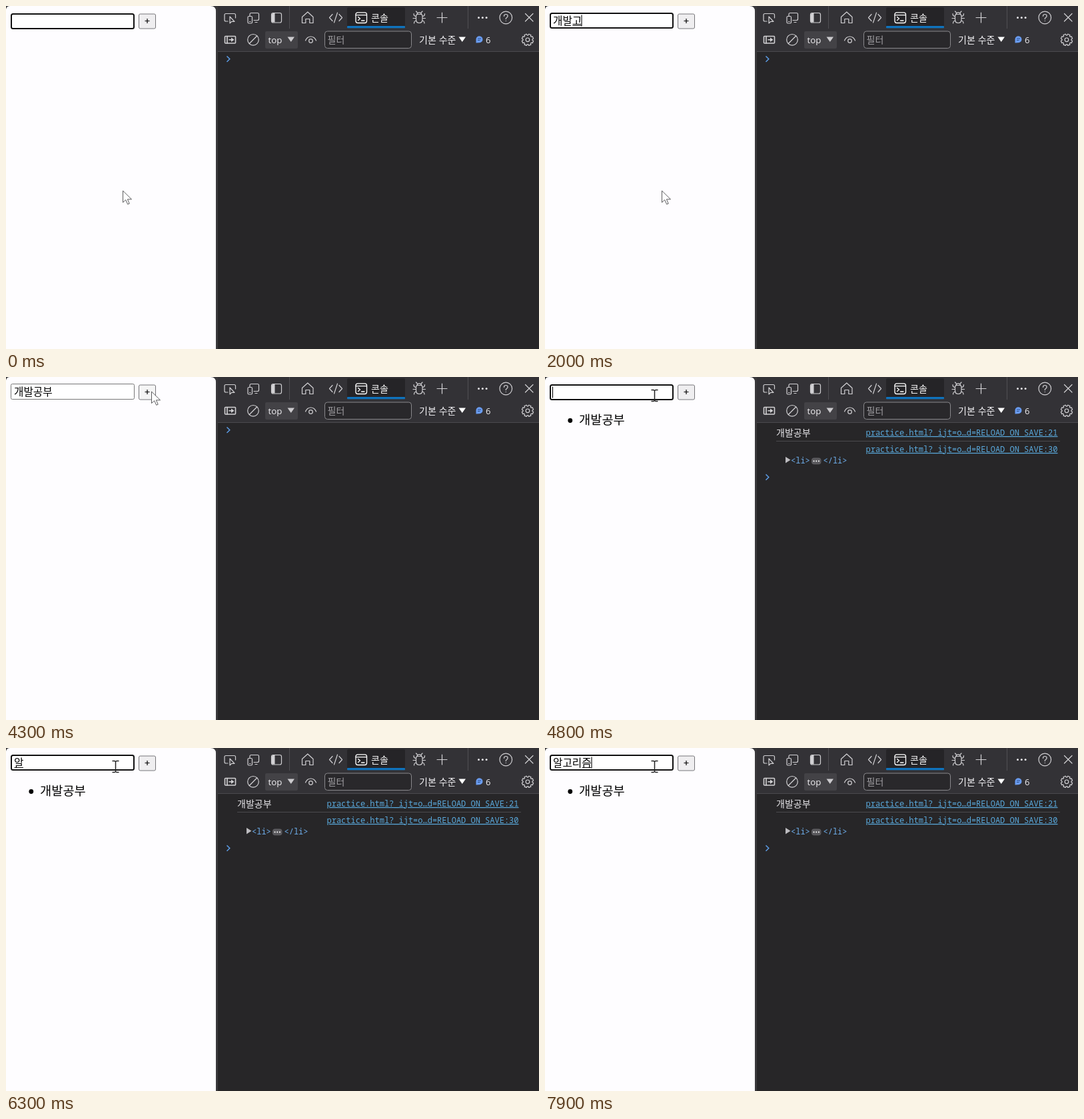
An HTML page that plays this animation: 800x516 px, repeating every 8000 ms.

```html
<!DOCTYPE html>
<html lang="ko">
<head>
<meta charset="utf-8">
<title>할 일 입력과 콘솔</title>
<style>
  html, body { margin: 0; width: 100%; height: 100%; overflow: hidden; background: #39383b; }
  svg { display: block; width: 800px; height: 516px; }
  text { font-family: "Open Sans", "Noto Sans CJK KR", "Noto Sans CJK", sans-serif; font-size: 14px; white-space: pre; }
  .ko { font-family: "Noto Sans CJK KR", "Noto Sans CJK", sans-serif; }
  .mono { font-family: "Noto Sans Mono", "Liberation Mono", monospace; font-size: 12px; fill: #5aa9dc; }
  .link { text-decoration: underline; text-underline-offset: 1px; }
  .icons { fill: none; stroke: #d2d1d4; stroke-width: 1.2; stroke-linecap: round; stroke-linejoin: round; }
  .solid { fill: #d2d1d4; stroke: none; }
</style>
</head>
<body>
<svg viewBox="0 0 800 516" xmlns="http://www.w3.org/2000/svg">
  <!-- developer tools -->
  <rect width="800" height="516" fill="#39383b"/>
  <rect x="318" width="482" height="69" fill="#333236"/>
  <rect x="318" y="69" width="482" height="447" fill="#272628"/>
  <path d="M318 68.5H800" stroke="#4b4a4e"/>
  <path d="M425.5 0V34M693.5 0V34" stroke="#504f53"/>
  <rect x="512" y="2" width="87" height="31" rx="2" fill="#252427"/>
  <rect x="512" y="30" width="87" height="3.3" rx="1" fill="#0f73bd"/>
  <rect x="389" y="38" width="49" height="26" rx="2" fill="#434246"/>
  <rect x="478.5" y="38" width="130" height="25.5" rx="4" fill="#29282b" stroke="#89888c"/>

  <g class="icons">
    <path d="M333 23H330Q328 23 328 21V13.500Q328 11.500 330 11.500H342.500Q344.500 11.500 344.500 13.500V18"/>
    <path d="M336 16V26L338.700 23.300H343Z"/>
    <path d="M366 15V12.500Q366 10.500 368 10.500H377.500Q379.500 10.500 379.500 12.500V19.500Q379.500 21.500 377.500 21.500H372M374 24.500H377"/>
    <rect x="363" y="15.500" width="6.500" height="10.500" rx="1.500"/>
    <path d="M365.500 23.500H367"/>
    <rect x="398.500" y="10.500" width="15" height="14.500" rx="2.500"/>
    <path class="solid" d="M399 12.500Q399 11 401 11H403.500V24.500H401Q399 24.500 399 23Z"/>
    <path d="M444.500 16.500L452.800 9L461 16.500V25.500H455.800V19.500H449.800V25.500H444.500Z"/>
    <path d="M490 12.500L485.500 17.500L490 22.500M500 12.500L504.500 17.500L500 22.500M497.500 10L492.500 25"/>
    <g stroke="#fff" stroke-width="1.300">
      <rect x="525" y="9.800" width="16.500" height="15.700" rx="3"/>
      <path d="M525 13.700H541.500M528.500 16.500L531.500 19L528.500 21.500M533.500 22H538"/>
    </g>
    <path d="M615.500 15Q615.500 12.500 618 12.500H622.500Q625 12.500 625 15V20.500Q625 25.500 620.250 25.500T615.500 20.500ZM617 12.500Q617 9.800 620.250 9.800T623.500 12.500M617 9.500L615.500 8M623.500 9.500L625 8M615.500 15.500Q612 15.500 612 11.500M625 15.500Q628.500 15.500 628.500 11.500M615.500 18.500H611M625 18.500H629.500M616 22Q612.500 22.500 612.500 26M624.500 22Q628 22.500 628 26"/>
    <path d="M647 17.500H662M654.500 10V25"/>
    <path d="M779.500 11.500L791 23M791 11.500L779.500 23"/>
    <circle cx="750.300" cy="17.500" r="9.300"/>
    <path d="M747.500 15.300Q747.500 12.500 750.300 12.500T753.100 15Q753.100 16.500 751.500 17.500T750.300 19.700M750.300 22.300V22.400"/>
    <g stroke-width="1.600">
      <rect x="328.500" y="45.500" width="16" height="10.500" rx="1"/>
      <path d="M332 45.500V56M335 50.800H340"/>
      <path class="solid" d="M338 47.500L342.500 50.800L338 54Z"/>
    </g>
    <circle cx="371" cy="50.800" r="8.300"/>
    <path d="M365.300 56.500L376.700 45"/>
    <path d="M449.500 52Q452 46 457.500 46T465.500 52"/>
    <circle cx="457.500" cy="52.500" r="2.800"/>
    <circle cx="783" cy="50.800" r="2.800"/>
    <path id="gear"/>
  </g>
  <g fill="#e4e3e6">
    <circle cx="709.500" cy="17.500" r="1.500"/><circle cx="715.300" cy="17.500" r="1.500"/><circle cx="721.100" cy="17.500" r="1.500"/>
    <path d="M422.500 46.500H433L427.750 54Z" fill="#cbcacd"/>
    <path d="M679.500 46.500H690L684.750 54Z" fill="#fff"/>
  </g>
  <path d="M705.500 55.500V50A5 5 0 1 1 710.500 55.300Z" fill="#6a9cf0"/>
  <path d="M708 49H713M708 51.500H711.500" stroke="#2c4f8a"/>
  <g fill="#f2f1f4">
    <text class="ko" x="548" y="22.500" fill="#fff" font-weight="500">콘솔</text>
    <text x="393.500" y="56" style="font-size:13.300px">top</text>
    <text class="ko" x="482.500" y="56" fill="#a09fa3">필터</text>
    <text class="ko" x="620" y="56">기본 수준</text>
    <text x="720" y="56" style="font-size:13px">6</text>
  </g>

  <g id="log">
    <text class="ko" x="347" y="89" fill="#e6e5e8">개발공부</text>
    <text class="mono link" x="481.500" y="88">practice.html?_ijt=o…d=RELOAD_ON_SAVE:21</text>
    <path d="M347 96.500H773" stroke="#4b4a4e"/>
    <text class="mono link" x="481.500" y="113">practice.html?_ijt=o…d=RELOAD_ON_SAVE:30</text>
    <path d="M361 120L368.500 124.700L361 129.500Z" fill="#bdbcc0"/>
    <text class="mono" x="369" y="130" style="fill:#6fb0ee">&lt;li&gt;</text>
    <rect x="400" y="121.500" width="14.500" height="10" rx="4" fill="#5a595d"/>
    <path d="M403.500 126.500h.1m3.600 0h.1m3.600 0h.1" stroke="#fff" stroke-width="2" stroke-linecap="round"/>
    <text class="mono" x="417.500" y="130" style="fill:#6fb0ee">&lt;/li&gt;</text>
  </g>
  <path id="prompt" d="M331.500 75.500L335.800 79.700L331.500 84" fill="none" stroke="#5c9ce6" stroke-width="1.500"/>

  <!-- web page -->
  <path d="M0 516V5Q1 0 6 0H307Q315 0 315 8V516Z" fill="#fefdff"/>
  <rect id="field" fill="#fff"/>
  <text id="typed" class="ko" x="12" y="27.500" style="font-size:15.700px"></text>
  <path id="underline" stroke="#111"/>
  <path id="caret" stroke="#000" stroke-width="1.100"/>
  <rect id="button" x="199.500" y="12" width="25" height="22" rx="2" stroke="#77767a"/>
  <path d="M208.500 22.500H215.500M212 19V26" stroke="#000" stroke-width="1.200"/>
  <g id="item">
    <circle cx="37.800" cy="65.500" r="3.400"/>
    <text class="ko" x="51" y="71.300" style="font-size:18.700px">개발공부</text>
  </g>
  <path id="arrow" d="M0 0V17.500L4.200 13.700L7.200 20.300L9.700 19.200L6.900 12.800H13Z" fill="#fff" stroke="#4a4a4c" stroke-width=".9" stroke-linejoin="round"/>
  <path id="beam" d="M-5 -8.500H-1.500L0 -7.500L1.500 -8.500H5M0 -7.500V7.500M-5 8.500H-1.500L0 7.500L1.500 8.500H5" fill="none" stroke="#222" stroke-width="1.500"/>
</svg>
<script>
const LOOP = 8000, TICK = 100, BLINK = 500, ADVANCE = 15.7 * 0.92;
const PRESS = 4200, RELEASE = 4500, REFOCUS = 4700;

// [time, field text]; each entry also restarts the caret
const typing = [
  [0, ''], [900, 'ㄱ'], [1100, '개'], [1400, '갭'], [1500, '개바'], [1700, '개발'],
  [1900, '개밝'], [2000, '개발고'], [2200, '개발공'], [2800, '개발공ㅂ'], [3000, '개발공부'],
  [RELEASE, ''], [REFOCUS, ''], [5400, 'ㅇ'], [5600, '아'], [5700, '알'], [6400, '앍'],
  [6600, '알고'], [6900, '알골'], [7100, '알고리'], [7400, '알고맂'], [7600, '알고리즈'], [7800, '알고리즘']
];
// [time, x, y]
const pointer = [
  [0, 175, 278], [3100, 175, 278], [3300, 194, 236], [3600, 239, 112],
  [3800, 230, 52], [4000, 218, 22], [4500, 218, 22], [4700, 164, 28]
];

const $ = id => document.getElementById(id);
const set = (id, attrs) => Object.entries(attrs).forEach(([k, v]) => $(id).setAttribute(k, v));
const show = (id, on) => set(id, { visibility: on ? 'visible' : 'hidden' });

function pointerAt(t) {
  const next = pointer.findIndex(p => p[0] > t);
  if (next < 0) return pointer[pointer.length - 1].slice(1);
  const a = pointer[next - 1], b = pointer[next];
  const k = (t - a[0]) / (b[0] - a[0]);
  return [a[1] + (b[1] - a[1]) * k, a[2] + (b[2] - a[2]) * k];
}

function drawField(t) {
  const [since, text] = typing.filter(s => s[0] <= t).pop();
  const focused = t < PRESS || t >= REFOCUS;
  // Hangul glyphs lift the box by one pixel
  const top = text ? 10 : 11;
  set('field', focused
    ? { x: 8, y: top + 1, width: 184, height: 22, rx: 2.5, stroke: '#101010', 'stroke-width': 2 }
    : { x: 7.5, y: top + 0.5, width: 185, height: 23, rx: 2, stroke: '#767676', 'stroke-width': 1 });
  $('typed').textContent = text;

  const end = 12 + text.length * ADVANCE;
  set('underline', { d: `M${end - ADVANCE + 0.5} 29.5H${end - 0.5}` });
  show('underline', focused && text);

  const phase = since ? t - since : t + 800;
  set('caret', { d: `M${Math.round(end) + (text ? 0 : -0.5)} ${top + 3.5}V${top + 20.5}` });
  show('caret', focused && Math.floor(phase / BLINK) % 2 === 0);
}

function drawPointer(t) {
  const [x, y] = pointerAt(t);
  const overField = x < 193 && y < 35;
  const overButton = x >= 199 && x < 226 && y < 35;
  const move = { transform: `translate(${x + 0.5} ${y})` };
  set('arrow', move);
  set('beam', move);
  show('arrow', !overField);
  show('beam', overField);
  const pressed = t >= PRESS && t < RELEASE;
  set('button', { fill: pressed ? '#f5f5f5' : overButton ? '#e5e5e5' : '#efeef0' });
}

function draw(now) {
  const t = Math.floor((now % LOOP) / TICK) * TICK;
  const added = t >= RELEASE;
  drawField(t);
  drawPointer(t);
  show('log', added);
  show('item', added);
  set('prompt', { transform: `translate(0 ${added ? 71 : 0})` });
}

function gearPath() {
  const points = [];
  for (let i = 0; i < 8; i++) {
    for (const [turn, r] of [[-0.28, 7], [-0.2, 8.8], [0.2, 8.8], [0.28, 7]]) {
      const a = (i + 0.5) * Math.PI / 4 + turn;
      points.push(`${(783 + r * Math.cos(a)).toFixed(1)} ${(50.8 + r * Math.sin(a)).toFixed(1)}`);
    }
  }
  return `M${points.join('L')}Z`;
}

set('gear', { d: gearPath() });
const start = performance.now();
function loop() {
  draw(performance.now() - start);
  requestAnimationFrame(loop);
}
loop();
</script>
</body>
</html>
```
